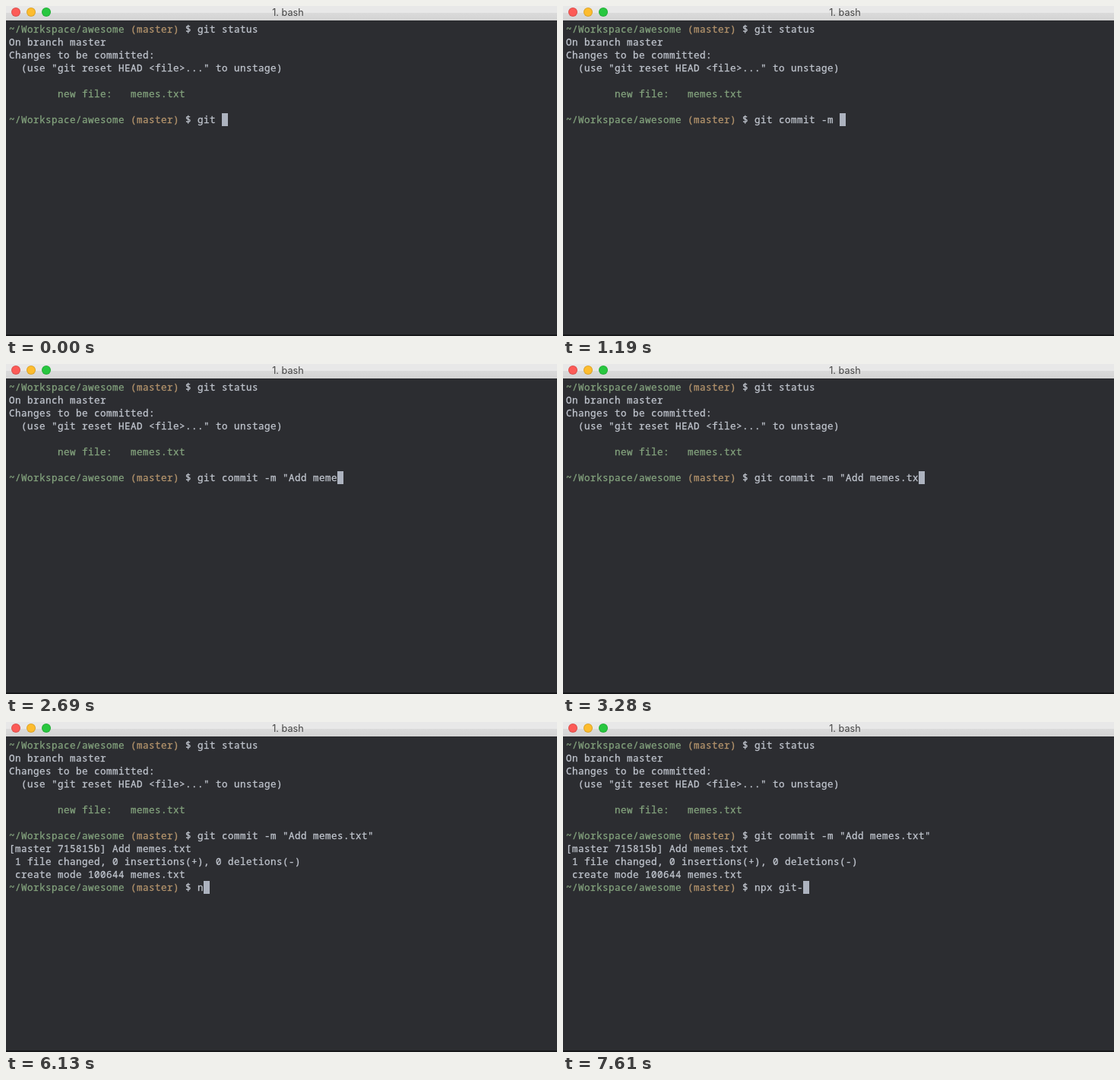
These frames come from a looping animation (725 px wide and 434 px high, 8000 ms). An HTML page:

```html
<!DOCTYPE html>
<html lang="en">
<head>
<meta charset="utf-8">
<title>Terminal</title>
<style>
  html, body { margin: 0; width: 100%; height: 100%; overflow: hidden; background: #2c2d31; }
  #stage { position: relative; width: 725px; height: 434px; overflow: hidden; background: #2c2d31; }
  #bar {
    position: absolute; left: 0; top: 0; width: 725px; height: 19px;
    background: linear-gradient(#e8e8e8 9px, #dadada 9px, #d4d4d4);
  }
  #bar i {
    position: absolute; top: 2px; width: 12px; height: 12px;
    box-sizing: border-box; border-radius: 50%; border: 1px solid #0002;
  }
  #title {
    position: absolute; left: 0; top: 0; width: 742px; text-align: center;
    font: 400 12.7px/17px Inter, Roboto, sans-serif; color: #444;
  }
  #screen {
    position: absolute; left: 4px; top: 22px; white-space: pre;
    font: 500 12.5px/17px "Noto Sans Mono", "DejaVu Sans Mono", monospace;
    letter-spacing: .5px; font-variant-ligatures: none;
    color: #c0c5ce; -webkit-text-stroke: .3px;
  }
  #screen div { height: 17px; }
  .path { color: #83a27d; }
  .branch { color: #b4946c; }
  .cursor { display: inline-block; vertical-align: top; width: 8px; height: 17px; background: #adb3bf; }
  #edge { position: absolute; left: 0; bottom: 0; width: 725px; height: 2px; background: #17181a; }
</style>
</head>
<body>
<div id="stage">
  <div id="bar">
    <i style="left:7px;background:#fc5b57"></i>
    <i style="left:27px;background:#fdbc2e"></i>
    <i style="left:47px;background:#28c73f"></i>
    <div id="title">1. bash</div>
  </div>
  <div id="screen"></div>
  <div id="edge"></div>
</div>
<script>
const LOOP = 8000, BEAT = 149.3, LEAD = 9;

// Keys pressed on each beat; an empty beat is a pause.
const beats = (
  'git |c|o|mm||it| -||m ||"||A||dd| |m|e|me|s|.|t|x||t|"||\n' +
  '|'.repeat(14) + 'n||p|x||| g|i||t|-'
).split('|');

const prompt = '<span class="path">~/Workspace/awesome</span> <span class="branch">(master)</span> $ ';
const cursor = '<span class="cursor"></span>';

const before = [
  prompt + 'git status',
  'On branch master',
  'Changes to be committed:',
  '  (use "git reset HEAD &lt;file&gt;..." to unstage)',
  '',
  '<span class="path">        new file:   memes.txt</span>',
  ''
];
const result = [
  '[master 715815b] Add memes.txt',
  ' 1 file changed, 0 insertions(+), 0 deletions(-)',
  ' create mode 100644 memes.txt'
];

const screen = document.getElementById('screen');
let shownBeat = -1;

function draw(t) {
  const beat = Math.floor((t + LEAD) / BEAT);
  if (beat === shownBeat) return;
  shownBeat = beat;
  const [commit, next] = beats.slice(0, beat + 1).join('').split('\n');
  const rows = [...before, prompt + commit];
  if (next !== undefined) rows.push(...result, prompt + next);
  rows[rows.length - 1] += cursor;
  screen.innerHTML = rows.map(row => `<div>${row}</div>`).join('');
}

const start = performance.now();
function tick() {
  draw((performance.now() - start) % LOOP);
  requestAnimationFrame(tick);
}
tick();
</script>
</body>
</html>
```
